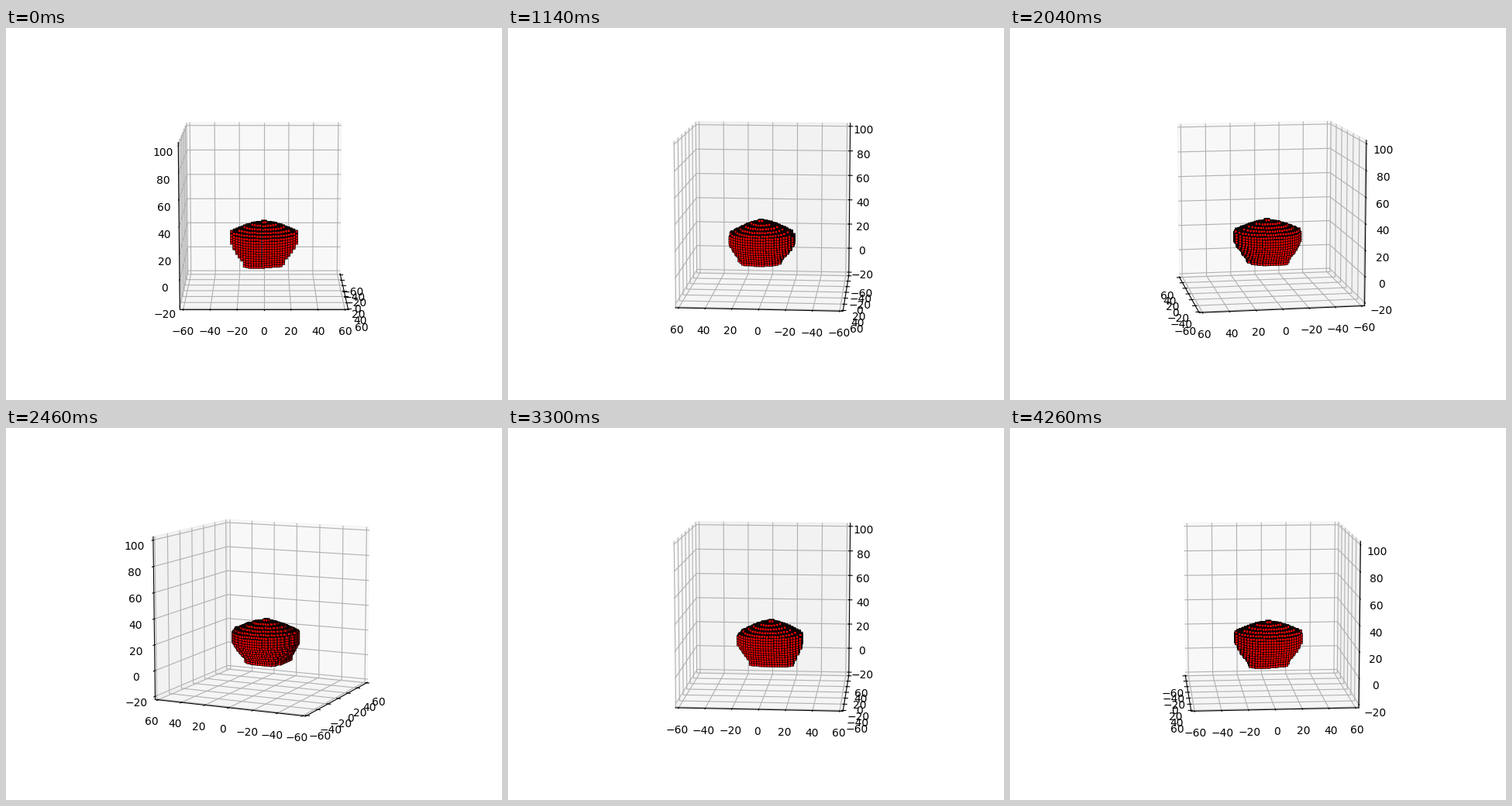
A matplotlib script that plays this animation: 640x480 px, repeating every 4320 ms.

```python
import numpy as np
import matplotlib.pyplot as plt
from matplotlib.animation import FuncAnimation
from mpl_toolkits.mplot3d.art3d import Poly3DCollection

FRAMES, INTERVAL = 72, 60
ELEV, CELL = 10, 2.0
CENTRE_X, RIM = 3.2, 25.5


def bump(deg, at, width):
    d = (deg - at + 180) % 360 - 180
    return np.exp(-(d / width) ** 2)


def solid(x, y, z):
    """True inside a bowl with a low conical lid."""
    dx = x - CENTRE_X
    r = np.hypot(dx, y)
    deg = np.degrees(np.arctan2(y, dx))
    base = (15.5 + 6 * bump(deg, 328, 35) + 3 * bump(deg, 225, 20)
            + 2.5 * bump(deg, 42, 20))
    rise = np.clip((z - 4) / 12, 0, 1) ** 0.7
    wall = base + (RIM - base) * rise
    rim_z = 23.5 - 1.3 * np.cos(np.radians(2 * deg))
    lid = 33.5 - (33.5 - rim_z) * (r / RIM) ** 1.3
    return (z > 0) & (r < wall) & (z < lid)


def shell():
    """Quads and normals of all exposed cell faces."""
    side = np.arange(-33, 35, CELL)
    up = np.arange(-3, 39, CELL)
    grid = np.stack(np.meshgrid(side, side, up, indexing="ij"), axis=-1)
    full = solid(grid[..., 0], grid[..., 1], grid[..., 2])
    quads, normals = [], []
    for axis in range(3):
        for sign in (-1, 1):
            bare = full & ~np.roll(full, -sign, axis)
            n, u, v = np.roll(np.eye(3), -axis, axis=0)
            n = n * sign
            corners = np.array([n - u - v, n + u - v, n + u + v, n - u + v])
            faces = grid[bare][:, None, :] + corners * CELL / 2
            quads.append(faces)
            normals.append(np.tile(n, (len(faces), 1)))
    return np.concatenate(quads), np.concatenate(normals)


quads, normals = shell()
middles = quads.mean(axis=1)

fig = plt.figure(figsize=(6.4, 4.8), dpi=100)
ax = fig.add_subplot(projection="3d")
ax.set_box_aspect((1, 1, 1), zoom=3 ** 0.5 / 1.8294640721620434)
ax.set(xlim=(-62.5, 62.5), ylim=(-62.5, 62.5), zlim=(-22.5, 102.5))
ax.set_xticks(range(-60, 61, 20))
ax.set_yticks(range(-60, 61, 20))
ax.set_zticks(range(-20, 101, 20))

body = Poly3DCollection(quads, facecolors="red", edgecolors="black",
                        linewidths=0.5)
ax.add_collection3d(body)


def update(i):
    azim = i * 360 / FRAMES
    # A tiny tilt settles which walls show in head-on views.
    ax.view_init(ELEV, azim + 1e-6 * np.sin(np.radians(45 - azim)))
    e, a = np.radians((ELEV, azim))
    eye = np.array([0, 0, 40]) + 1200 * np.array(
        [np.cos(e) * np.cos(a), np.cos(e) * np.sin(a), np.sin(e)])
    facing = ((eye - middles) * normals).sum(axis=1) > 0
    body.set_verts(quads[facing])
    return body,


anim = FuncAnimation(fig, update, frames=FRAMES, interval=INTERVAL,
                     init_func=lambda: update(0), repeat=True,
                     repeat_delay=0, blit=False)
plt.show()
```
